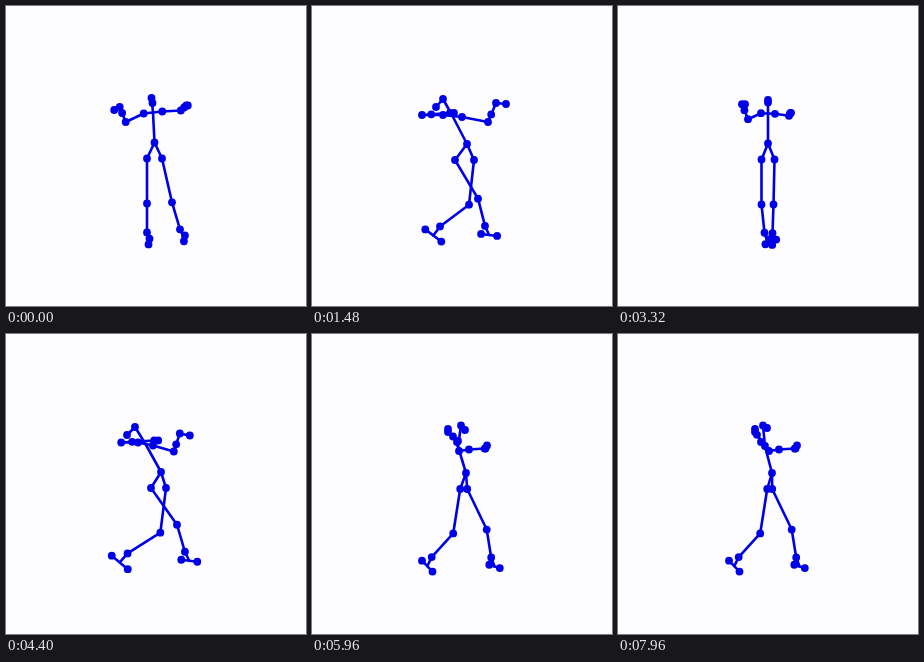
An HTML page with a canvas for the animation above (8000 ms loop, 300 by 300 pixels).

```html
<!DOCTYPE html>
<html lang="en">
<head>
<meta charset="utf-8">
<title>Walking stick figure</title>
<style>
html, body { margin: 0; width: 100%; height: 100%; overflow: hidden; background: #fdfdff; }
canvas { display: block; width: 300px; height: 300px; }
</style>
</head>
<body>
<canvas id="stage" width="300" height="300"></canvas>
<script>
const ctx = document.getElementById('stage').getContext('2d');
const LOOP = 8000, STEP = 40;
const INK = '#0000e8', PAPER = '#fdfdff';
const THIGH = 45, SHIN = 29;

const add = (p, q) => [p[0] + q[0], p[1] + q[1]];
const lerp = (p, q, k) => p.map((v, i) => v + (q[i] - v) * k);

// The wrist sits part of the way from elbow to hand.
function arm(shoulder, { elbow, hand, tip, wrist = 0.6 }) {
  const e = add(shoulder, elbow), h = add(e, hand);
  return [shoulder, e, lerp(e, h, wrist), h, add(e, tip)];
}

// Knee and ankle are sideways offsets from the hip; bone lengths set the height.
function leg(hip, [kneeX, ankleX], foot) {
  const shinX = ankleX - kneeX;
  const knee = add(hip, [kneeX, Math.sqrt(THIGH ** 2 - kneeX ** 2)]);
  const ankle = add(knee, [shinX, SHIN - 0.25 * Math.abs(shinX)]);
  const sole = add(ankle, [0.3 * shinX + 2, 9]);
  const tilt = 6 - 0.25 * Math.abs(foot) + 0.35 * Math.max(0, -shinX);
  const half = [foot / 2, tilt / 2];
  return [hip, knee, ankle, add(sole, half.map(v => -v)), add(sole, half)];
}

// Returns spine, left arm, right arm, left leg, right leg.
function body(b) {
  const chest = add(b.pelvis, b.chest);
  const hips = add(b.pelvis, [b.hipShift, 16]);
  const [sx, sy] = b.shoulder;
  return [
    [b.pelvis, add(b.pelvis, b.crown), add(b.pelvis, b.face)],
    arm(add(chest, [-sx, -sy]), b.armL),
    arm(add(chest, [sx, sy]), b.armR),
    leg(add(hips, [-b.hip, 0]), b.legL, b.foot),
    leg(add(hips, [b.hip, 0]), b.legR, b.foot)
  ];
}

// Facing the viewer; sway runs from -1 (left leg out) to 1 (right leg out).
function front(sway) {
  const out = Math.abs(sway), left = Math.max(0, -sway), right = Math.max(0, sway);
  const lean = 3 * out - 6 * sway;
  return body({
    pelvis: [150 - 1.5 * sway, 137.5 - sway],
    chest: [lean / 2, -30],
    crown: [lean, -43.5 - sway],
    face: [lean + sway, -41 + 1.5 * sway],
    shoulder: [7 + 2.3 * out, 0.3 - 1.3 * sway],
    hip: 6.5 + out, hipShift: 0,
    armL: { elbow: [-13 - 5 * out, 6 + 2.5 * sway], hand: [-6, -15], tip: [-3 - 8.5 * out, -15 + 3 * sway] },
    armR: { elbow: [14 + 4.5 * out, 2 - 3 * sway], hand: [1.5 + 4 * sway, -3 - 2 * out], tip: [2 + 5 * sway, -3 - 2 * out] },
    legL: [-13 * left, 3 - 18 * left - 3 * right],
    legR: [11 * right - 1, 20 * right - 2 + 4 * left],
    foot: -4 + 3 * sway
  });
}

// Side-on, left leg ahead, leaning back; turn narrows the body and lengthens the step.
function leftStep(turn) {
  const reach = 1 - 0.2 * turn, step = 1 + 0.13 * turn;
  return body({
    pelvis: [155, 138], chest: [-14.5 - turn, -28],
    crown: [-24 - 2 * turn, -45], face: [-31 - 3 * turn, -37],
    shoulder: [9.5 - 2 * turn, 1 + turn / 2],
    hip: 9.5 - 2 * turn, hipShift: -2.5,
    armL: { elbow: [-21 * reach, 0], hand: [28 + 5 * turn, -2], tip: [32 + 5 * turn, -2], wrist: 0.33 },
    armR: { elbow: [26 * reach, 5 + turn], hand: [8 - 2 * turn, -19 + turn], tip: [18 - 2 * turn, -18 + 2 * turn], wrist: 0.4 },
    legL: [23 * step, 30 * step], legR: [-5 * step, -34 * step],
    foot: 16
  });
}

// Side-on, right leg ahead, upright.
function rightStep(turn) {
  return body({
    pelvis: [154, 139], chest: [-8 + turn, -26.5],
    crown: [-5 - 4 * turn, -47.5], face: [-1 - 4 * turn, -43 - 2 * turn],
    shoulder: [1 + 3 * turn, 4.5],
    hip: 3.5 - turn, hipShift: -2.3,
    armL: { elbow: [1 + 3 * turn, -1 + 5 * turn], hand: [-10, -9 - 5 * turn], tip: [-10, -12 - 5 * turn], wrist: 0.5 + 0.3 * turn },
    armR: { elbow: [10, -1.5], hand: [16.5, -1], tip: [18, -4], wrist: 0.95 },
    legL: [-7, -28.5], legR: [19.5, 24],
    foot: 10.5
  });
}

const track = [
  [0, front(1)], [500, leftStep(0)], [980, rightStep(0)], [1480, leftStep(0)],
  [1900, rightStep(1)], [2300, leftStep(1)], [2600, front(0)], [2960, front(0.4)],
  [3320, front(0)], [3640, leftStep(0)], [4000, rightStep(0)], [4400, leftStep(1)],
  [4720, rightStep(0)], [5040, front(0)], [5500, front(-0.4)],
  [5960, rightStep(0)], [6720, front(-1)], [7340, leftStep(0)], [7960, rightStep(1)]
];

function poseAt(t) {
  const next = track.findIndex(key => key[0] > t);
  if (next < 0) return track[track.length - 1][1];
  const [t0, from] = track[next - 1], [t1, to] = track[next];
  const k = 0.5 - 0.5 * Math.cos(Math.PI * (t - t0) / (t1 - t0));
  return from.map((part, i) => part.map((p, j) => lerp(p, to[i][j], k)));
}

function bones(...path) {
  ctx.beginPath();
  path.forEach(p => ctx.lineTo(...p));
  ctx.stroke();
}

function draw(pose) {
  const [spine, armL, armR, legL, legR] = pose;
  const [pelvis, crown, face] = spine;
  const chest = lerp(armL[0], armR[0], 0.5);

  ctx.fillStyle = PAPER;
  ctx.fillRect(0, 0, 300, 300);
  ctx.strokeStyle = ctx.fillStyle = INK;
  ctx.lineWidth = 2.6;
  ctx.lineJoin = ctx.lineCap = 'round';

  bones(pelvis, chest, crown, face);
  for (const limb of [armL, armR]) bones(chest, ...limb);
  for (const [hip, knee, ankle, heel, toe] of [legL, legR]) {
    bones(pelvis, hip, knee, ankle, lerp(heel, toe, 0.5));
    bones(heel, toe);
  }
  for (const [x, y] of pose.flat()) {
    ctx.beginPath();
    ctx.arc(x, y, 3.9, 0, Math.PI * 2);
    ctx.fill();
  }
}

function tick() {
  const t = performance.now() % LOOP;
  draw(poseAt(Math.floor(t / STEP) * STEP));
  requestAnimationFrame(tick);
}
tick();
</script>
</body>
</html>
```
